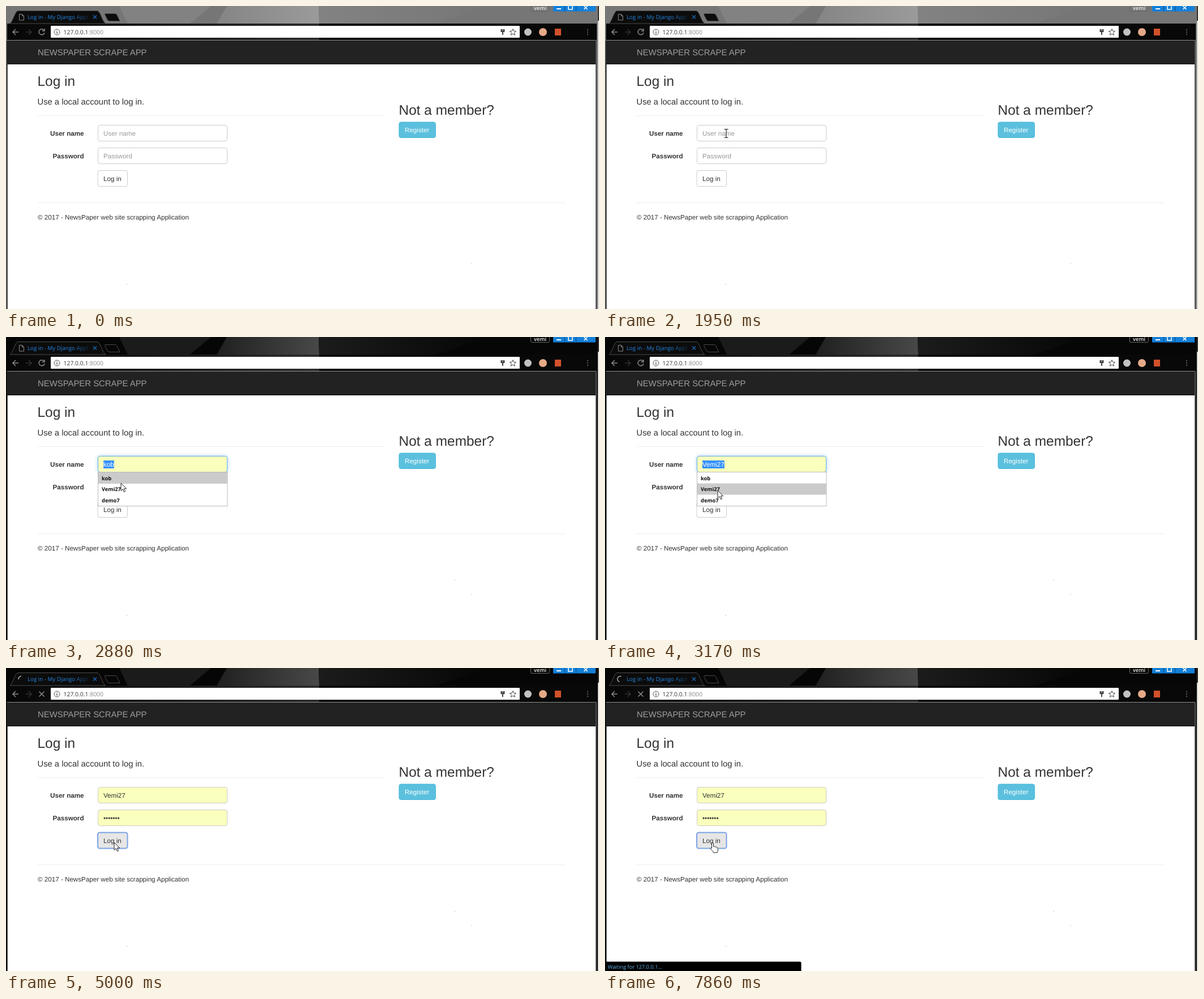
Recreate the animation shown at these times as an HTML page. Size 1047x535 px, loop 8 s.

```html
<!DOCTYPE html>
<html lang="en">
<head>
<meta charset="utf-8">
<title>Log in</title>
<style>
html, body { margin: 0; width: 100%; height: 100%; overflow: hidden; background: #fff; }
svg { display: block; width: 1047px; height: 535px; font: 11.63px "Liberation Sans", Arial, sans-serif; fill: #333; text-rendering: geometricPrecision; }
.ui { font-family: "Open Sans", "Noto Sans", sans-serif; }
.h2 { font-size: 24.45px; }
.h4 { font-size: 14.75px; }
.b { font-weight: bold; }
.end { text-anchor: end; }
.mid { text-anchor: middle; }
.hint { fill: #999; }
.line { fill: none; stroke: #8a8a8a; stroke-width: 1.5; }
.field { fill: #fff; stroke: #ccc; }
.field.auto { fill: #faffbd; }
.field.focus { stroke: #66afe9; filter: drop-shadow(0 0 3px rgba(102, 175, 233, .6)); }
.button { fill: #fff; stroke: #ccc; }
.button.hover { fill: #e6e6e6; stroke: #adadad; }
.button.pressed { fill: #e6e6e6; stroke: #7ba3e6; stroke-width: 2; }
.cursor path { fill: #fff; stroke: #222; stroke-width: 1; stroke-linejoin: round; }
.cursor #ibeam { fill: none; stroke: #222; stroke-width: 1.1; }
.tab { fill: #0c0c0c; stroke: #4a4a4a; }
</style>
</head>
<body>
<svg viewBox="0 0 1047 535">
  <defs>
    <linearGradient id="fade" gradientUnits="userSpaceOnUse" x1="118" x2="148" y1="0" y2="0">
      <stop stop-color="#2387e6"/><stop offset="1" stop-color="#2387e6" stop-opacity=".1"/>
    </linearGradient>
    <linearGradient id="facet">
      <stop stop-color="#202020"/><stop offset="1" stop-color="#484848"/>
    </linearGradient>
    <linearGradient id="shade">
      <stop stop-color="#1c1c1c"/><stop offset="1" stop-color="#060606"/>
    </linearGradient>
    <linearGradient id="bar" gradientUnits="userSpaceOnUse" x1="2" x2="553" y1="0" y2="0">
      <stop stop-color="#060606"/><stop offset="1" stop-color="#2c2c2c"/>
    </linearGradient>
  </defs>
  <rect width="1047" height="535" fill="#fff"/>

  <!-- window frame -->
  <rect width="1045" height="61" fill="#060606"/>
  <path d="M200 0H362L325 31H215Z" fill="#1b1b1b"/>
  <path d="M390 0H552L553 31H372Z" fill="url(#facet)"/>
  <path d="M552 0H850L760 31H553Z" fill="url(#shade)"/>
  <rect id="tint" width="1045" height="31" fill="#fff" opacity=".45"/>
  <rect x="2" y="31" width="1040" height="29" fill="#080808"/>
  <rect x="2" y="31" width="551" height="29" fill="url(#bar)"/>
  <rect x="2" y="60" width="1040" height="1" fill="#8d8d8d"/>
  <g id="edges">
    <rect y="31" width="2" height="504"/><rect x="1043" y="31" width="2" height="504"/>
  </g>
  <path d="M2 61V535M1042 61V535" stroke="#1a1a1a" stroke-width="1.500"/>
  <rect x="1045" y="26" width="2" height="509" fill="#dcdcdc"/>
  <rect x="1045" width="2" height="26" fill="#333"/>

  <!-- tabs -->
  <path class="tab" d="M7 31C12 28 16 9 21 8.500H161C167 9 170 28 176 31Z"/>
  <path id="newTab" class="tab" d="M175 13.500H192Q195 13.500 196 16L201 26.500H183Q180 26.500 179 24L174.500 15Z"/>
  <path id="page" class="line" style="stroke-width:1" d="M23.500 14.500H28.500L31.500 17.500V25H23.500ZM28.500 14.500V17.500H31.500"/>
  <path id="spinner" class="line" style="stroke:#b0b0b0"/>
  <text class="ui" x="38" y="23" font-size="9.75" fill="url(#fade)">Log in - My Django Appl</text>
  <path class="line" style="stroke:#1c64ad" d="M154 16.500l6 6m0-6l-6 6"/>

  <!-- window controls -->
  <path id="badge" d="M926.500 0V7Q926.500 9.500 929 9.500H957Q959.500 9.500 959.500 7V0" stroke="#666"/>
  <text class="ui mid" x="943" y="6.500" font-size="9.4" font-weight="600" fill="#eee">vemi</text>
  <rect x="966" width="75" height="9.500" fill="#1480d8"/>
  <path d="M986.500 0V9.500M1006.500 0V9.500" stroke="#0a4a88"/>
  <path d="M972 5H980" stroke="#fff" stroke-width="2"/>
  <rect x="993" y="-1" width="7" height="7" fill="none" stroke="#fff" stroke-width="1.500"/>
  <path d="M1020.500 0l6 6m0-6l-6 6" stroke="#fff" stroke-width="1.500"/>

  <!-- toolbar -->
  <path class="line" d="M22 46H12M17 41L12 46L17 51"/>
  <path class="line" style="stroke:#303030" d="M35 46H45M40 41L45 46L40 51"/>
  <path id="reload" class="line" d="M67 42.500A5 5 0 1 0 68 47M68 40V44H64"/>
  <path id="stop" class="line" d="M58.500 41.500l9 9m0-9l-9 9"/>
  <rect x="79" y="35" width="828" height="21" rx="1" fill="#fff"/>
  <circle cx="90" cy="46" r="5" fill="none" stroke="#555"/>
  <path d="M90 45V49M90 43V44" stroke="#444" stroke-width="1.200"/>
  <text class="ui" x="101.500" y="49.500" font-size="10.4">127.0.0.1<tspan fill="#8a8a8a">:8000</tspan></text>
  <path d="M873.500 41H880.500V46H878V51H876V46H873.500Z" fill="#444"/>
  <rect x="876" y="42" width="2" height="1" fill="#fff"/>
  <path d="M895 40.500l1.600 3.700 4 .3-3 2.700.9 4-3.500-2.100-3.500 2.100.9-4-3-2.700 4-.3Z" fill="none" stroke="#444"/>
  <circle cx="921.500" cy="46" r="6.500" fill="#c2c2c2"/>
  <circle cx="948" cy="46" r="7" fill="#e6a987"/>
  <rect x="969" y="40" width="11" height="12" fill="#d2512a"/>
  <path d="M1027 41v2m0 2v2m0 2v2" stroke="#5a5a5a" stroke-width="2"/>

  <!-- page -->
  <rect x="2" y="61" width="1039" height="42" fill="#222"/>
  <rect x="2" y="102" width="1039" height="1" fill="#080808"/>
  <text x="56" y="86.500" font-size="14.9" fill="#9d9d9d">NEWSPAPER SCRAPE APP</text>
  <text class="h2" x="55.500" y="140.500">Log in</text>
  <text class="h4" x="55.500" y="174">Use a local account to log in.</text>
  <path d="M56 193.500H669.500M56 347.500H988" stroke="#eee"/>
  <text class="b end" x="137.500" y="228.500">User name</text>
  <text class="b end" x="137.500" y="268.500">Password</text>
  <rect id="user" x="162.500" y="210.500" width="228" height="28" rx="3.500"/>
  <rect id="selection" x="172" y="218" width="19" height="14" fill="#3390ff"/>
  <text id="userText" x="172" y="228.500"></text>
  <rect id="pass" x="162.500" y="250.500" width="228" height="28" rx="3.500"/>
  <text id="passText" x="172" y="268.500"></text>
  <rect id="login" x="162" y="290.500" width="52.500" height="28" rx="3.500"/>
  <text x="172" y="308.500">Log in</text>
  <text class="h2" x="693.500" y="191.500">Not a member?</text>
  <rect x="694" y="205" width="64.500" height="27.500" rx="3.500" fill="#5bc0de" stroke="#46b8da"/>
  <text x="704" y="223" fill="#fff">Register</text>
  <text x="56" y="376.500">© 2017 - NewsPaper web site scrapping Application</text>
  <g fill="#999">
    <rect x="213" y="491" width="1" height="1"/><rect x="821.500" y="454" width="1" height="1"/>
    <rect id="speck" x="792" y="429" width="1" height="1"/>
  </g>

  <g id="menu">
    <rect x="162.500" y="238.500" width="228.500" height="60" fill="#fff" stroke="#bbb"/>
    <rect id="row" x="163" width="228" height="20" fill="#cbcbcb"/>
    <g class="ui b" font-size="9.3" fill="#111">
      <text x="169" y="252.500">kob</text><text x="169" y="272">Vemi27</text><text x="169" y="291.500">demo7</text>
    </g>
  </g>
  <g id="status">
    <path d="M2 535V518.500H344Q346.500 518.500 346.500 521V535Z" fill="#000"/>
    <text class="ui" x="5" y="530.500" font-size="9.25" fill="#62b4ee">Waiting for 127.0.0.1...</text>
  </g>
  <g id="cursor" class="cursor">
    <path id="arrow" d="M0 0V13.500L3.200 10.600 5.400 15.600 7.600 14.600 5.400 9.800H9.600Z"/>
    <path id="ibeam" d="M-3.500-7.500H-1L0-6.500 1-7.500H3.500M0-6.500V6.500M-3.500 7.500H-1L0 6.500 1 7.500H3.500"/>
    <path id="hand" d="M-1.500 1.200a1.500 1.500 0 0 1 3 0V6.500c1-.8 2.400-.4 2.700.6 1-.6 2.200-.2 2.500.8 1.400-.5 2.600.2 2.600 1.600V13c0 2-1 2.500-1 4H1.500C1 14.500-1.500 13-3.600 10.200c-.8-1.200.8-2.300 2.100-.9z"/>
  </g>
</svg>
<script>
const LOOP = 8000, TICK = 151.3, FIRST_TICK = 280, SPIN_START = 4610, SPIN_TURN = 1320;
const $ = id => document.getElementById(id);

// time, pointer shape, x, y, state changes
const steps = [
  [0, '', 0, 0],
  [280, 'arrow', 873, 467],
  [440, 'arrow', 789, 405],
  [730, 'arrow', 521, 285],
  [1030, 'arrow', 420, 215],
  [1180, 'arrow', 335, 168],
  [1330, 'arrow', 275, 151],
  [1490, 'arrow', 238, 172],
  [1640, 'arrow', 222, 198],
  [1790, 'ibeam', 215, 218],
  [1950, 'ibeam', 214, 225],
  [2110, 'ibeam', 214, 225, { active: true, focus: 'user' }],
  [2260, 'ibeam', 214, 225, { menu: true }],
  [2570, 'arrow', 207, 243, { row: 0, user: 'kob', selected: true }],
  [2720, 'arrow', 204, 252],
  [2880, 'arrow', 203, 258],
  [3020, 'arrow', 201, 265, { row: 1, user: 'Vemi27' }],
  [3170, 'arrow', 199, 271],
  [3490, 'arrow', 199, 271, { menu: false, selected: false, pass: '•••••••' }],
  [3950, 'arrow', 195, 282],
  [4100, 'hand', 188, 291, { hover: true }],
  [4240, 'hand', 189, 298],
  [4390, 'hand', 190, 304],
  [4540, 'hand', 190, 308],
  [4680, 'hand', 190, 308, { focus: 'login', loading: true }],
  [4830, 'arrow', 191, 308],
  [5150, 'hand', 190, 309, { status: true }]
];

const show = (id, on) => { $(id).style.display = on ? '' : 'none'; };

function stateAt(t) {
  const s = { user: '', pass: '', row: -1 };
  for (const [time, shape, x, y, change] of steps) {
    if (time > t) break;
    Object.assign(s, { shape, x, y }, change);
  }
  return s;
}

function setField(id, value, hint, focused) {
  $(id).setAttribute('class', 'field' + (value ? ' auto' : '') + (focused ? ' focus' : ''));
  const text = $(id + 'Text');
  text.textContent = value || hint;
  text.setAttribute('class', value ? '' : 'hint');
}

// The arc grows from twelve o'clock, then trails half a turn behind its head.
function spinnerPath(t) {
  const tick = FIRST_TICK + Math.floor((t - FIRST_TICK) / TICK) * TICK;
  const head = 90 + 360 * Math.max(30, tick - SPIN_START) / SPIN_TURN;
  const tail = Math.max(90, head - 179.9);
  const point = deg => {
    const a = deg * Math.PI / 180;
    return `${27 + 5 * Math.cos(a)} ${19.5 - 5 * Math.sin(a)}`;
  };
  return `M${point(tail)}A5 5 0 0 0 ${point(head)}`;
}

function render(t) {
  const s = stateAt(t);
  show('tint', !s.active);
  show('speck', s.active);
  $('newTab').style.fill = s.active ? 'none' : '';
  $('badge').style.fill = s.active ? '#080808' : '#777';
  $('edges').style.fill = s.active ? '#0a0a0a' : '#777';

  setField('user', s.user, 'User name', s.focus === 'user');
  setField('pass', s.pass, 'Password', false);
  show('selection', s.selected);
  $('selection').setAttribute('width', $('userText').getComputedTextLength());
  $('userText').style.fill = s.selected ? '#fff' : '';
  show('menu', s.menu);
  show('row', s.row >= 0);
  $('row').setAttribute('y', 239 + 19.5 * Math.max(0, s.row));
  $('login').setAttribute('class', 'button' + (s.focus === 'login' ? ' pressed' : s.hover ? ' hover' : ''));

  show('page', !s.loading);
  show('reload', !s.loading);
  show('stop', s.loading);
  show('spinner', s.loading);
  if (s.loading) $('spinner').setAttribute('d', spinnerPath(t));
  show('status', s.status);

  for (const shape of ['arrow', 'ibeam', 'hand']) show(shape, s.shape === shape);
  $('cursor').setAttribute('transform', `translate(${s.x} ${s.y})`);
}

const start = performance.now();
function frame() {
  render((performance.now() - start) % LOOP);
  requestAnimationFrame(frame);
}
frame();
</script>
</body>
</html>
```
